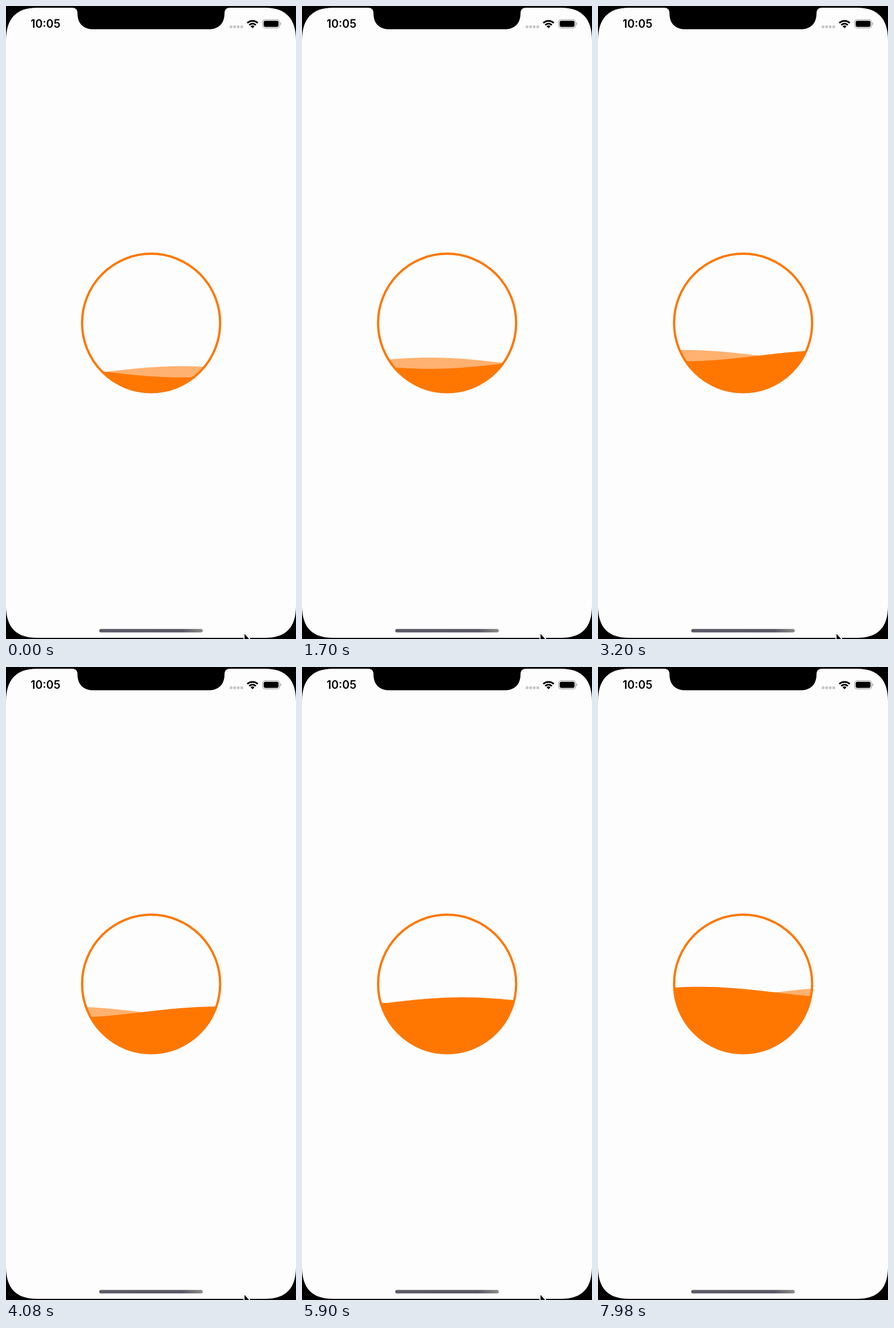
Write an HTML page that moves like this. It is 507 px wide and 1104 px high and loops after 8000 ms.

```html
<!DOCTYPE html>
<html lang="en">
<head>
<meta charset="utf-8">
<title>Wave progress</title>
<style>
  html, body { margin: 0; width: 100%; height: 100%; overflow: hidden; background: #000; }
  svg { display: block; width: 507px; height: 1104px; }
  text { font: 600 19.5px Inter, "Liberation Sans", sans-serif; }
</style>
</head>
<body>
<svg viewBox="0 0 507 1104">
  <defs>
    <clipPath id="disc"><circle cx="253.7" cy="552.8" r="121.5"/></clipPath>
    <linearGradient id="bar">
      <stop offset="0" stop-color="#5c5966"/>
      <stop offset=".8" stop-color="#595663"/>
      <stop offset="1" stop-color="#8c8b86"/>
    </linearGradient>
  </defs>

  <path fill="#fdfdfd" d="M0 60C0 22 18 3 54 3H453C489 3 507 22 507 60V1046C507 1084 489 1102 453 1102H54C18 1102 0 1084 0 1046Z"/>
  <path d="M112 0V3H116Q125 3 125 13C125 30 135 40.5 152 40.5H355C372 40.5 382 30 382 13Q382 3 391 3H395V0Z"/>

  <text x="43" y="38.3">10:05</text>
  <path stroke="#c6c6c6" stroke-width="4.4" stroke-dasharray="4.6 1.7" d="M391 36.3H414.5"/>
  <g fill="none" stroke="#000" stroke-width="3">
    <path d="M422 29.6A13 13 0 0 1 440 29.6"/>
    <path d="M425.3 33.2A8 8 0 0 1 436.7 33.2"/>
  </g>
  <path d="M431 38.8L427.6 35.4A4.8 4.8 0 0 1 434.4 35.4Z"/>
  <rect x="448.6" y="23.8" width="29.8" height="14.6" rx="4.4" fill="none" stroke="#a8a8a8" stroke-width="1.3"/>
  <rect x="450.5" y="25.8" width="26" height="10.6" rx="2.8"/>
  <path fill="#a8a8a8" d="M479.6 28.6Q481.4 29.5 481.4 31.1T479.6 33.6Z"/>

  <g clip-path="url(#disc)">
    <path id="back" fill="#ffb170"/>
    <path id="front" fill="#ff7700"/>
  </g>
  <circle cx="253.7" cy="552.8" r="120.7" fill="none" stroke="#fa7806" stroke-width="4"/>

  <rect x="163" y="1086.5" width="181" height="6" rx="3" fill="url(#bar)"/>
  <path id="cursor" d="M0 0V24L5.4 19L9 28.5L12.6 27L8.8 17.8H16Z" stroke="#fff" stroke-width="3.4"
    paint-order="stroke" stroke-linejoin="round" style="filter: drop-shadow(0 1px 1.2px #0006)"/>
</svg>

<script>
const LOOP = 8000, AMP = 9.8, WAVELENGTH = 530;
const [back, front, cursor] = ["back", "front", "cursor"].map(id => document.getElementById(id));

// Pointer track: time, x, y
const track = [
  [6200, 417, 1095], [6360, 485, 900], [6600, 52, 520], [6740, 12, 410],
  [7020, 358, 320], [7300, 530, 250]
];

// Steps last 20, 20 and 100 ms in turn.
function stepTime(t) {
  const rest = (t + 20) % 140;
  return t - rest + Math.min(40, Math.floor(rest / 20) * 20);
}

function wave(t, side) {
  const level = 638 - 0.00883 * t;
  const node = 175 - 0.0495 * t;
  let d = "M128 680";
  for (let x = 128; x <= 380; x += 4) {
    const y = level + side * AMP * Math.sin((x - node) * 2 * Math.PI / WAVELENGTH);
    d += `L${x} ${y.toFixed(2)}`;
  }
  return d + "L380 680Z";
}

function pointer(t) {
  if (t <= track[0][0]) return track[0].slice(1);
  const i = track.findIndex(p => p[0] > t);
  if (i < 0) return track[track.length - 1].slice(1);
  const [t0, x0, y0] = track[i - 1], [t1, x1, y1] = track[i];
  const k = (t - t0) / (t1 - t0);
  return [x0 + (x1 - x0) * k, y0 + (y1 - y0) * k];
}

function draw() {
  const t = stepTime(performance.now() % LOOP);
  back.setAttribute("d", wave(t, -1));
  front.setAttribute("d", wave(t, 1));
  cursor.setAttribute("transform", `translate(${pointer(t)})`);
  requestAnimationFrame(draw);
}
draw();
</script>
</body>
</html>
```
